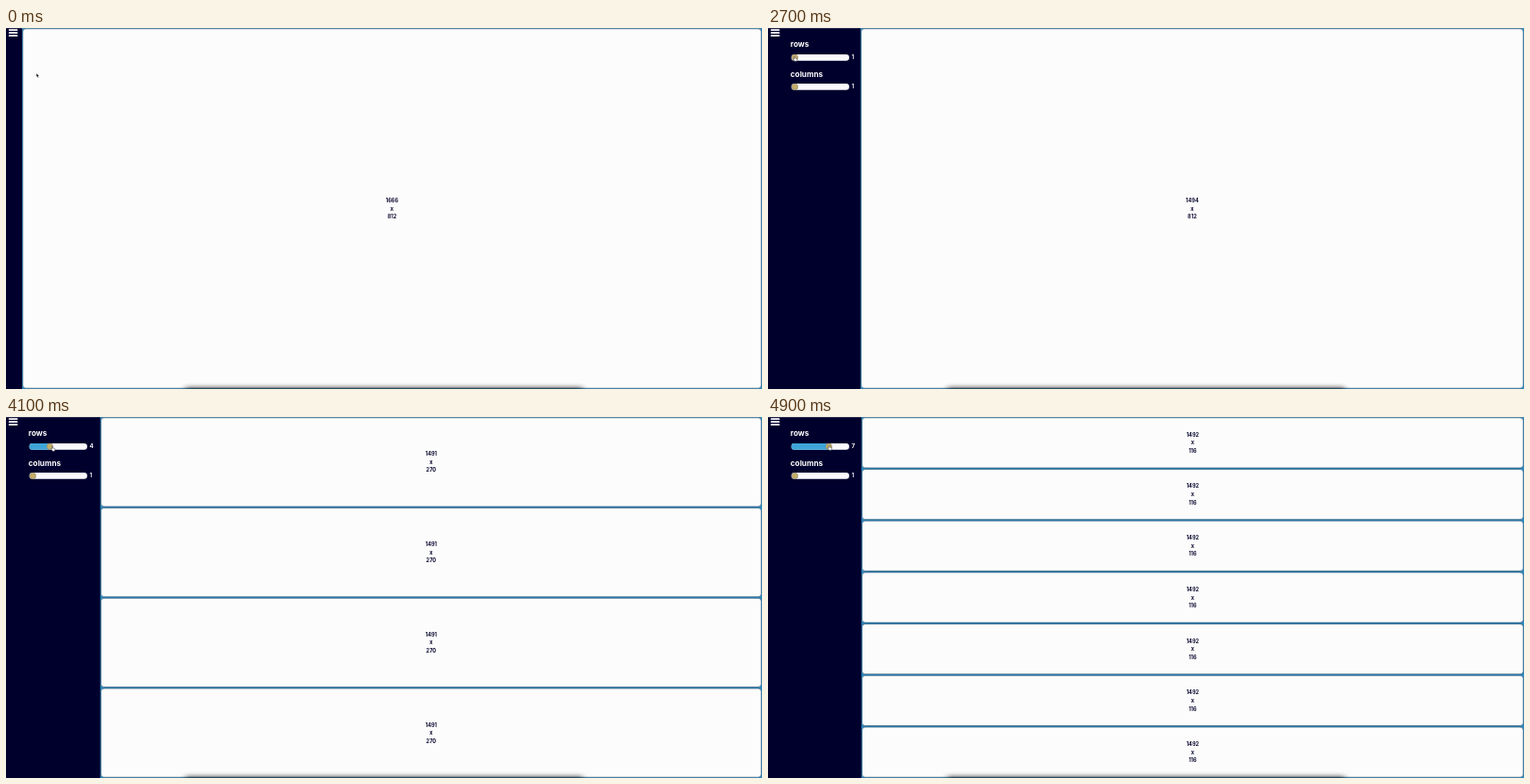
These frames come from a looping animation (800 px wide and 383 px high, 5 s). An HTML page:

```html
<!DOCTYPE html>
<html lang="en">
<head>
<meta charset="utf-8">
<title>Grid resizer</title>
<style>
  html, body { margin: 0; width: 100%; height: 100%; overflow: hidden; background: #00002d; }
  svg { display: block; width: 800px; height: 383px; font-family: Inter, "Open Sans", sans-serif; }
  .size { font-size: 5.6px; font-weight: 700; fill: #0a0a30; text-anchor: middle; }
  .label { font-size: 8.2px; font-weight: 700; fill: #fff; }
  .value { font-size: 6px; font-weight: 700; fill: #fff; }
</style>
</head>
<body>
<svg viewBox="0 0 800 383" xmlns="http://www.w3.org/2000/svg">
  <defs>
    <filter id="soft" x="-10%" y="-100%" width="120%" height="300%">
      <feGaussianBlur stdDeviation="3 2"/>
    </filter>
  </defs>
  <rect width="800" height="383" fill="#00002d"/>
  <g id="panel"></g>
  <g id="grid"></g>
  <rect x="190" y="380.5" width="420" height="14" fill="#000" opacity=".5" filter="url(#soft)"/>
  <rect width="800" height=".5" fill="#8a8f98" opacity=".5"/>
  <path d="M3.6 2.2h8M3.6 5.2h8M3.6 8.2h8" stroke="#fff" stroke-width="1.7" stroke-linecap="round"/>
  <g id="pointer"></g>
</svg>
<script>
const LOOP = 5000, STEP = 100, SCALE = 0.47, HEIGHT = 383;
const OPEN_AT = 17;
const CLOSED_WIDTH = 1666;
const WIDTHS = [1494, 1491, 1491, 1490, 1490, 1490, 1492];

// Steps at which the slider reaches 2, 3, 4... rows
const ROW_STEPS = [33, 37, 41, 44, 46, 48];

// Pointer path: step, x, y
const PATH = [
  [0, 32.2, 48], [1, 28, 41], [2, 18, 24], [3, 10, 12], [4, 7.3, 7.2],
  [19, 7.3, 7.2], [20, 9, 9], [22, 18, 20], [24, 26, 28.5], [25, 27.5, 29.8],
  [27, 27, 30], [29, 27, 30], [35, 36, 30], [38, 41, 30.4], [41, 48, 31],
  [43, 49.6, 31], [45, 53, 30.2], [49, 63.5, 30]
];

const $ = id => document.getElementById(id);
const rowsAt = step => 1 + ROW_STEPS.filter(s => step >= s).length;
const widthAt = step => step < OPEN_AT ? CLOSED_WIDTH : WIDTHS[rowsAt(step) - 1];

function pathAt(step) {
  const i = PATH.findIndex(p => p[0] >= step);
  const b = PATH[i], a = PATH[Math.max(0, i - 1)];
  const k = b === a ? 0 : (step - a[0]) / (b[0] - a[0]);
  return [a[1] + (b[1] - a[1]) * k, a[2] + (b[2] - a[2]) * k];
}

function slider(name, value, y) {
  const x = 28.4 + 6 * (value - 1);
  const bar = (w, fill) =>
    `<rect x="24.7" y="${y - 3.4}" width="${w}" height="6.8" rx="3.3" fill="${fill}"/>`;
  return `<text class="label" x="23.8" y="${y - 10.9}">${name}</text>` +
    bar(61.2, "#fafafc") + (value > 1 ? bar(x - 23, "#3fa5d8") : "") +
    `<circle cx="${x}" cy="${y}" r="3.2" fill="#c5ad68" stroke="#8f8a70" stroke-width=".7"/>` +
    `<text class="value" x="88.5" y="${y + 1.8}">${value}</text>`;
}

function cells(step) {
  const rows = rowsAt(step), h = HEIGHT / rows;
  const left = 800 - widthAt(step) * SCALE, w = 800 - left;
  const mid = left + w / 2;
  // Labels lag one step behind a row change
  const seen = step > OPEN_AT ? step - 1 : step;
  const lines = [widthAt(seen), "x", Math.floor(812 / rowsAt(seen))];
  let out = `<rect x="${left}" width="${w}" height="${HEIGHT}" fill="#2b87bd"/>`;
  for (let i = 0; i < rows; i++) {
    const y = i * h;
    out += `<rect x="${left + .8}" y="${y + .8}" width="${w - 1.6}" height="${h - 1.6}" rx="3.2"
      fill="#fcfcfc" stroke="#27506e" stroke-width=".6"/>`;
    lines.forEach((s, j) => {
      out += `<text class="size" x="${mid}" y="${y + h / 2 + (j - 1) * 8.6 + 2}">${s}</text>`;
    });
  }
  return out;
}

function pointer(step) {
  const [x, y] = pathAt(step);
  const hand = (step >= 4 && step <= 20) || step >= 24;
  const shape = hand
    ? `<path d="M.6 .4q.6-.6 1 .2v1.3l1.9.5q.6.3.4 1.2l-.4 1.6h-2.3l-1.5-2q.1-.7.9-.2z"
        fill="#fff" stroke="#222" stroke-width=".45"/>`
    : `<path d="M0 0v4l.9-.8.7 1.5.8-.4-.7-1.4h1.2z" fill="#000" stroke="#fff" stroke-width=".35"/>`;
  return `<g transform="translate(${x} ${y})">${shape}</g>`;
}

function draw(step) {
  $("panel").innerHTML = step < OPEN_AT ? "" :
    slider("rows", rowsAt(step), 31.3) + slider("columns", 1, 62.4);
  $("grid").innerHTML = cells(step);
  $("pointer").innerHTML = pointer(step);
}

const start = performance.now();
let shown = -1;
function tick() {
  const step = Math.floor((performance.now() - start) % LOOP / STEP);
  if (step !== shown) draw(shown = step);
  requestAnimationFrame(tick);
}
tick();
</script>
</body>
</html>
```
